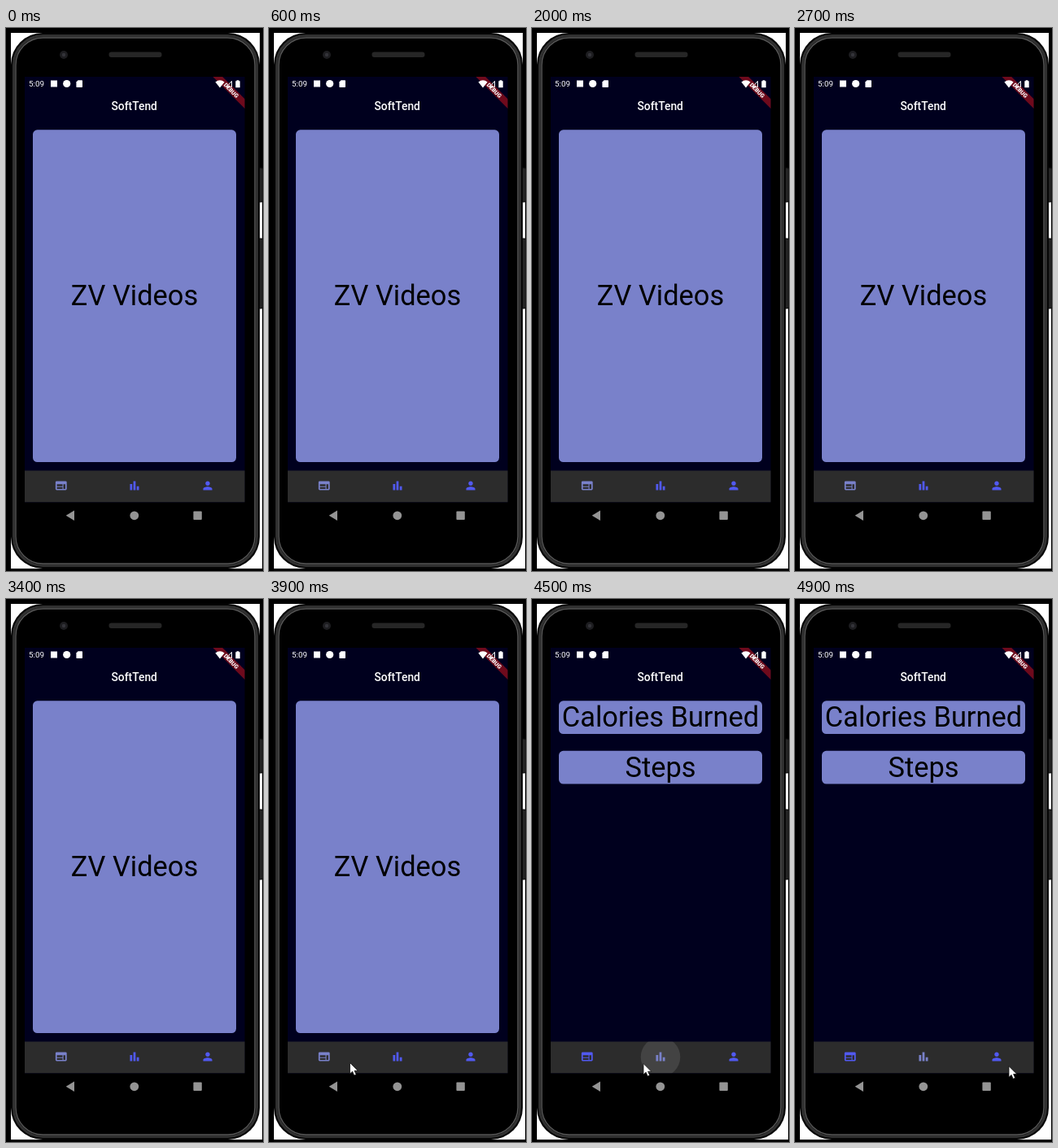
An HTML page that plays this animation: 316 px wide and 668 px high, repeating every 5 s.

```html
<!DOCTYPE html>
<html lang="en">
<head>
<meta charset="utf-8">
<title>Phone app preview</title>
<style>
  html, body { margin: 0; width: 100%; height: 100%; overflow: hidden; background: #000; }
  svg { display: block; width: 316px; height: 668px; }
  text { font-family: Roboto, sans-serif; }
  .big { font-size: 34.4px; text-anchor: middle; fill: #000; }
  .card { fill: #7981ca; }
  .tab { fill: #5159f0; }
  .tab.on { fill: #7981ca; }
</style>
</head>
<body>
<svg viewBox="0 0 316 668">
  <defs>
    <clipPath id="screen"><rect x="23" y="60" width="270.5" height="523.5"/></clipPath>
    <clipPath id="bar"><rect x="23" y="544.5" width="270.5" height="39"/></clipPath>
  </defs>

  <!-- Phone body -->
  <rect width="316" height="668" fill="#000"/>
  <g fill="#fff">
    <rect x="6" y="6" width="306" height="659"/>
    <rect x="311" y="214" width="4" height="45"/>
    <rect x="311" y="345" width="4" height="320"/>
  </g>
  <g fill="#242424" stroke="#0a0a0a">
    <rect x="308" y="172" width="8" height="42" rx="2"/>
    <rect x="308" y="259" width="8" height="86" rx="2"/>
  </g>
  <rect x="6" y="6" width="306" height="659" rx="39" fill="#050505"/>
  <rect x="9.5" y="9.5" width="299" height="652" rx="36" fill="none" stroke="#303030" stroke-width="3"/>
  <rect x="12" y="12" width="294" height="647" rx="33.5" fill="#000" stroke="#585858" stroke-width="1.4"/>
  <circle cx="71" cy="33" r="5" fill="#1d1d20"/>
  <circle cx="71" cy="33" r="2.2" fill="#34343a"/>
  <rect x="126.5" y="29.5" width="65" height="6.5" rx="3" fill="#262626"/>

  <!-- App screen -->
  <g clip-path="url(#screen)">
    <rect x="23" y="60" width="271" height="524" fill="#00001e"/>
    <text x="157.7" y="101.3" font-size="13.8" font-weight="500" text-anchor="middle" fill="#fff">SoftTend</text>

    <g id="videos">
      <rect class="card" x="33" y="125.3" width="250" height="408.7" rx="5.5"/>
      <text class="big" x="158" y="341.3">ZV Videos</text>
    </g>
    <g id="stats">
      <rect class="card" x="33" y="125.3" width="250" height="40.7" rx="5.5"/>
      <text class="big" x="158" y="157.3">Calories Burned</text>
      <rect class="card" x="33" y="186.8" width="250" height="40.7" rx="5.5"/>
      <text class="big" x="158" y="218.8">Steps</text>
    </g>

    <!-- Debug ribbon -->
    <g transform="translate(293.5 60) rotate(45)">
      <rect x="-28" y="19.3" width="56" height="8.3" fill="#6e0a1c"/>
      <text y="26" font-size="7" font-weight="900" text-anchor="middle" fill="#fff">DEBUG</text>
    </g>

    <!-- Status bar -->
    <g fill="#fff">
      <text x="28" y="72" font-size="9.8">5:09</text>
      <rect x="55" y="64.5" width="8" height="8"/>
      <circle cx="74.7" cy="68.5" r="4.6"/>
      <path d="M88.6 64.2h4.7q.7 0 .7.7v7.4q0 .7-.7.7h-6.2q-.7 0-.7-.7v-5.8z"/>
      <path d="M257.4 66.5q5.6-4.4 11.2 0l-5.6 6.9z"/>
      <path d="M277.5 65.4v7.1h-6.2z" fill="none" stroke="#fff"/>
      <path d="M283.6 64.2h2.8v1h1.3v8h-5.4v-8h1.3z"/>
    </g>

    <!-- Tab bar -->
    <rect x="23" y="544.5" width="271" height="39" fill="#2c2c2c"/>
    <circle id="ripple" cx="158" cy="563.5" r="24.3" fill="#fff" clip-path="url(#bar)"/>
    <path class="tab" transform="translate(59.5 554.7) scale(.69)" fill-rule="evenodd" d="M4 4h16q2 0 2 2v12q0 2-2 2H4q-2 0-2-2V6q0-2 2-2zM4.5 9.5h10V13h-10zM4.5 14.5h10V18h-10zM16 9.5h3.5V18H16z"/>
    <path class="tab" transform="translate(149.7 554.7) scale(.69)" d="M4 9h4v11H4zM10 4h4v16h-4zM16 13h4v7h-4z"/>
    <path class="tab" transform="translate(239.7 554.7) scale(.69)" d="M12 12c2.21 0 4-1.79 4-4s-1.79-4-4-4-4 1.79-4 4 1.79 4 4 4zm0 2c-2.67 0-8 1.34-8 4v2h16v-2c0-2.66-5.33-4-8-4z"/>
  </g>

  <!-- System buttons -->
  <g fill="#949494">
    <path d="M84 593.5v12.6l-10.3-6.3z"/>
    <circle cx="157.8" cy="599.8" r="5.4"/>
    <rect x="230.4" y="594.6" width="10.4" height="10.4" rx="1"/>
  </g>

  <path id="cursor" d="M0 0v13.6l3.1-2.9 2.1 4.9 2.5-1.1-2.1-4.7h4.2z" fill="#fff" stroke="#111" stroke-width=".8"/>
</svg>

<script>
const LOOP = 5000, STEP = 100, TAP = 4500;
const byId = id => document.getElementById(id);
const [videos, stats, ripple, cursor] = ['videos', 'stats', 'ripple', 'cursor'].map(byId);
const tabs = document.querySelectorAll('.tab');

// Pointer path: time, x, y
const path = [
  [3700, 44, 569.5], [3900, 99.5, 570.5], [4100, 124, 571], [4400, 133.5, 571.5],
  [4500, 137, 571.5], [4600, 166, 572.5], [4700, 226, 574], [4800, 263, 574.7], [5000, 263, 574.7]
];
// Ripple opacity: time, value
const fade = [[4500, .11], [4600, .08], [4800, 0], [5000, 0]];

function sample(keys, t) {
  const i = keys.findIndex(k => k[0] > t);
  const a = keys[i - 1], b = keys[i];
  const p = (t - a[0]) / (b[0] - a[0]);
  return a.slice(1).map((v, n) => v + (b[n + 1] - v) * p);
}

const show = (el, on) => el.setAttribute('visibility', on ? 'visible' : 'hidden');

function draw() {
  const t = Math.floor(performance.now() % LOOP / STEP) * STEP;
  const tapped = t >= TAP, pointing = t >= path[0][0];
  show(videos, !tapped);
  show(stats, tapped);
  show(cursor, pointing);
  tabs.forEach((tab, i) => tab.classList.toggle('on', i === (tapped ? 1 : 0)));
  ripple.setAttribute('opacity', tapped ? sample(fade, t)[0] : 0);
  if (pointing) cursor.setAttribute('transform', `translate(${sample(path, t)})`);
  requestAnimationFrame(draw);
}
draw();
</script>
</body>
</html>
```
